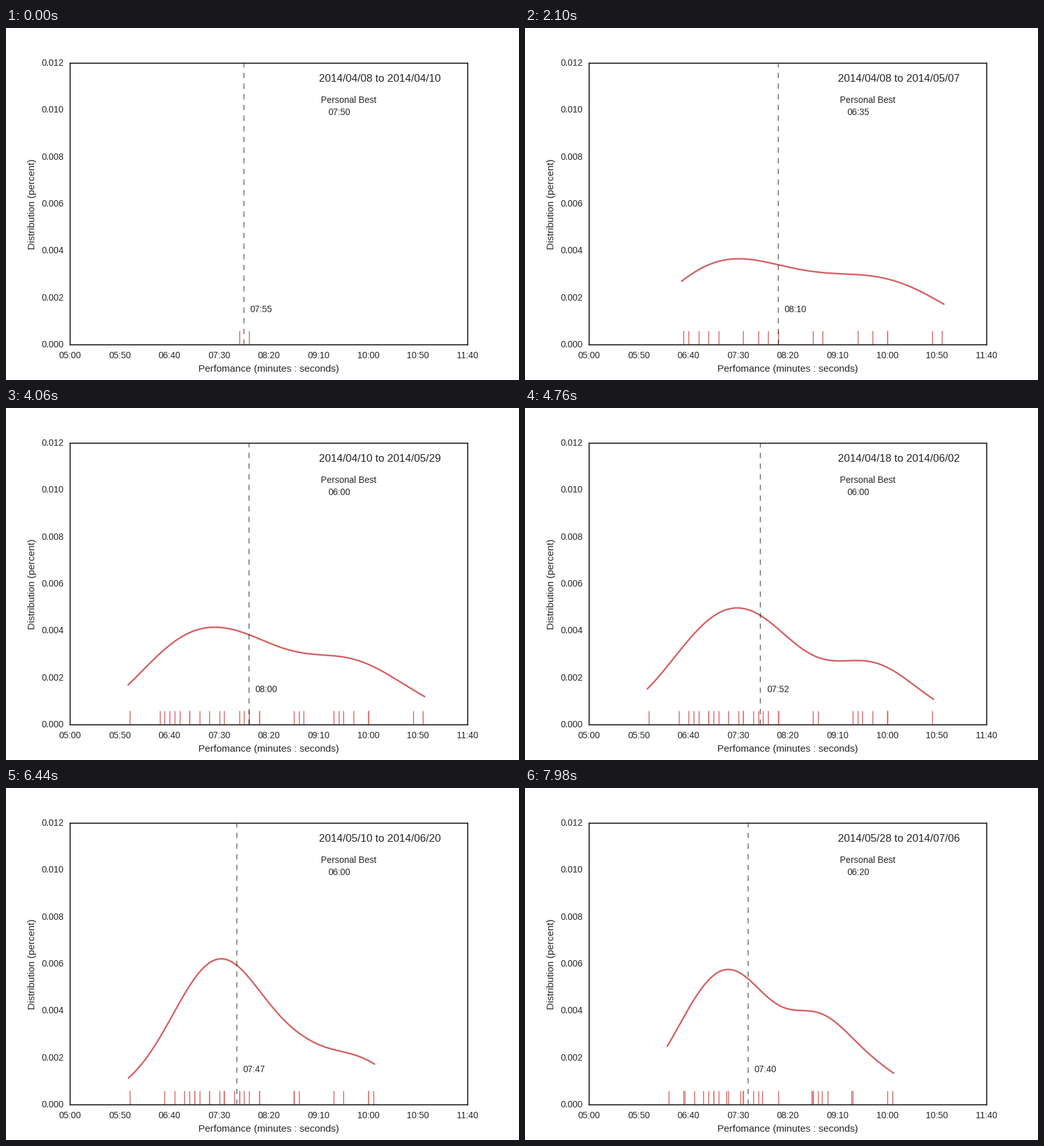
A matplotlib script for the animation above (8000 ms loop, 800x550 px).

```python
import matplotlib.pyplot as plt
import numpy as np
from matplotlib.animation import FuncAnimation

W, H, DPI = 800, 550, 100
LOOP, TICK, HOLD = 8000, 40, 140   # milliseconds
WINDOW = 30                        # most recent runs kept
INK, RED = "0.15", "#d65f5f"

# Run times in seconds, in order of date
RUNS = np.array([
    470, 480, 535, 395, 430, 655, 600, 645, 400, 490, 600, 420,
    570, 455, 585, 410, 525, 390, 530, 450, 490, 475, 440, 470,
    480, 360, 405, 600, 575, 420, 565, 455, 490, 425, 465, 430,
    415, 605, 470, 525, 440, 455, 425, 600, 525, 395, 455, 525,
    380, 540, 438, 524, 564, 452, 530, 406, 474, 396, 534])

# Days since the first run, known at a few runs and spread evenly between
RUN_KNOTS = [0, 1, 6, 12, 16, 23, 24, 29, 35, 41, 52, 58]
DAY_KNOTS = [0, 2, 10, 23, 29, 38, 42, 50, 55, 65, 80, 89]
DAYS = np.rint(np.interp(np.arange(len(RUNS)), RUN_KNOTS, DAY_KNOTS)).astype(int)
START = np.datetime64("2014-04-08")


def clock(sec):
    return f"{int(sec) // 60:02d}:{int(sec) % 60:02d}"


def date(i):
    return str(START + DAYS[i]).replace("-", "/")


def density(data):
    """Gaussian kernel density with Scott's bandwidth."""
    bw = data.std(ddof=1) * len(data) ** -0.2
    x = np.linspace(data.min() - 0.04 * bw, data.max() + 0.04 * bw, 128)
    z = (x[:, None] - data) / bw
    return x, np.exp(-z ** 2 / 2).sum(axis=1) / (len(data) * bw * np.sqrt(2 * np.pi))


plt.rcParams.update({
    "font.family": "Liberation Sans", "font.size": 10, "text.color": INK,
    "axes.labelcolor": INK, "axes.edgecolor": INK, "axes.linewidth": 1.25,
    "axes.labelsize": 11, "axes.labelpad": 5,
    "xtick.labelcolor": INK, "ytick.labelcolor": INK,
})

fig = plt.figure(figsize=(W / DPI, H / DPI), dpi=DPI, facecolor="white")
ax = fig.add_axes([0.125, 0.1, 0.775, 0.8])
ax.set(xlim=(300, 700), ylim=(0, 0.012),
       xlabel="Perfomance (minutes : seconds)", ylabel="Distribution (percent)")
x_ticks = np.arange(300, 701, 50)
y_ticks = np.arange(7) * 0.002
ax.set_xticks(x_ticks, [clock(t) for t in x_ticks])
ax.set_yticks(y_ticks, [f"{t:.3f}" for t in y_ticks], va="center")
ax.tick_params(length=0, pad=7)


def label(px, py, text="", size=10):
    return fig.text(px / W, 1 - py / H, text, fontsize=size,
                    ha="left", va="baseline")


curve, = ax.plot([], [], color=RED, lw=1.75, solid_capstyle="round")
rug = [ax.plot([], [], color=RED, lw=1, solid_capstyle="butt")[0]
       for _ in range(WINDOW)]
mid_line = ax.axvline(475, color="black", alpha=0.5, lw=1.25,
                      ls=(0, (4.8, 4.8)), dash_capstyle="butt", zorder=2.3)
mid_text = label(0, 444.5)
span_text = label(487.5, 84, size=12)
label(491.1, 117, "Personal Best")
best_text = label(502.6, 136)


def update(frame):
    step = (frame * TICK + TICK // 2) // HOLD
    last = step + 1
    first = max(0, last + 1 - WINDOW)
    data = RUNS[first:last + 1]

    curve.set_data(*(density(data) if len(data) > 2 else ([], [])))
    for i, line in enumerate(rug):
        if i < len(data):
            line.set_data([data[i]] * 2, [0, 0.0006])
        else:
            line.set_data([], [])

    mid = np.median(data)
    mid_line.set_xdata([mid, mid])
    mid_text.set_x((100 + (mid - 300) * 1.55 + 9.7) / W)
    mid_text.set_text(clock(mid))
    span_text.set_text(f"{date(first)} to {date(last)}")
    best_text.set_text(clock(data.min()))
    return [curve, *rug, mid_line, mid_text, span_text, best_text]


anim = FuncAnimation(fig, update, frames=LOOP // TICK, interval=TICK,
                     repeat=True, repeat_delay=0, blit=False)
plt.show()
```
